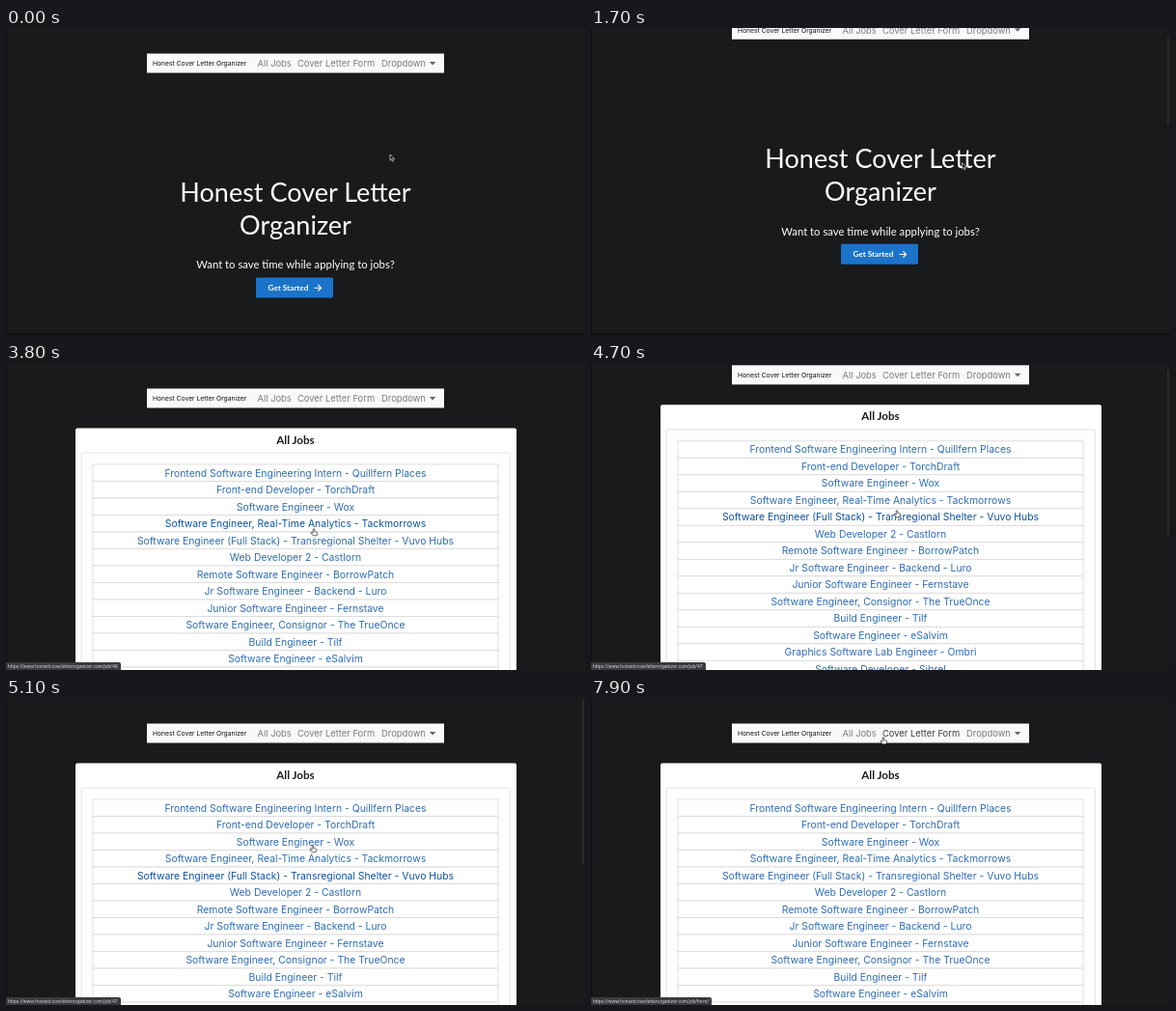
These frames come from a looping animation (600 px wide and 318 px high, 8 s). An HTML page:

```html
<!DOCTYPE html>
<html lang="en">
<head>
<meta charset="utf-8">
<title>Cover letter app</title>
<style>
html, body { margin: 0; width: 100%; height: 100%; overflow: hidden; background: #181a1b; }
svg { position: absolute; left: 0; top: 0; display: block; }
text { font-family: Inter, "Liberation Sans", sans-serif; }
.lato { font-family: Lato, "Open Sans", sans-serif; }
.bold { font-weight: 700; }
.mid { text-anchor: middle; }
.nav text { font-size: 9.4px; fill: #7c7c7e; }
.nav .brand { font-size: 6.76px; fill: #111; }
.nav .on { fill: #3d3d40; }
.foot { font-size: 5.6px; fill: #77797b; }
.foot .head { font-size: 6.3px; fill: #fff; }
.row rect { fill: #fff; stroke: #d8d8d8; stroke-width: .8; }
.row text { font-size: 10.4px; fill: #2f6db3; }
.row.on text { fill: #0f529e; }
#status {
  position: absolute; left: 0; top: 309.5px; height: 8.5px; padding: 0 3px 0 2px;
  border-radius: 0 2px 0 0; background: #393b3e; color: #dcdcdc; white-space: pre;
  font: 4.65px/8.5px Inter, "Liberation Sans", sans-serif;
}
</style>
</head>
<body>
<svg width="600" height="318" viewBox="0 0 600 318">
  <rect width="600" height="318" fill="#181a1b"/>
  <g id="page">
    <g class="nav">
      <rect x="146" y="26.5" width="308" height="20" fill="#f8f9fb"/>
      <text class="brand" x="152" y="39.3">Honest Cover Letter Organizer</text>
      <text x="260.5" y="40.3">All Jobs</text>
      <text id="form" x="302" y="40.3">Cover Letter Form</text>
      <g id="drop">
        <text x="389" y="40.3">Dropdown</text>
        <path d="M438.8 35h6.6l-3.3 3.4z" fill="#666"/>
      </g>
    </g>
    <g id="home" class="lato">
      <g fill="#fff" class="mid">
        <text class="lato" x="300" y="180" font-size="27">Honest Cover Letter</text>
        <text class="lato" x="300" y="214" font-size="27">Organizer</text>
        <text class="lato" x="300" y="249.3" font-size="11.3">Want to save time while applying to jobs?</text>
      </g>
      <rect id="button" x="259" y="258.5" width="80" height="21" rx="1.5" fill="#1b74c9"/>
      <text class="lato bold" x="271.5" y="272.2" font-size="8.2" fill="#fff">Get Started</text>
      <path d="M319.5 269.2h7M323.4 266l3.2 3.2-3.2 3.2" fill="none" stroke="#fff" stroke-width="1.1"/>
    </g>
    <g id="loading">
      <text class="lato bold mid" x="300" y="79.5" font-size="11.6">Loading</text>
      <path d="M147.5 109v40M235 109v40" stroke="#242627" stroke-width=".8"/>
      <g class="foot mid" id="foot"></g>
    </g>
    <g id="jobs">
      <rect x="72" y="67.5" width="457" height="420" rx="2" fill="#fff"/>
      <text class="lato bold mid" x="300" y="83.6" font-size="11.6" fill="#1b1c1d">All Jobs</text>
      <rect x="78" y="93" width="444.5" height="380" rx="2" fill="#fdfdfd" stroke="#dedede" stroke-width=".8"/>
      <g id="rows"></g>
    </g>
  </g>
  <rect y="316.6" width="600" height="1.4" fill="#0c0d0d" id="edge"/>
  <rect width=".7" height="318" fill="#0c0d0d"/>
  <rect id="thumb" x="597" width="2" rx="1" fill="#2a2a29"/>
  <g id="cursor" stroke-linejoin="round">
    <path id="arrow" d="M0 0v6.2l1.5-1.3 1 2.3 1.1-.5-1-2.2h2z" fill="#111" stroke="#ddd" stroke-width=".7"/>
    <path id="hand" d="M-.8 .6Q0-.4.8.6V3l2 .5q1 .3.8 1.5L3 7.3H-.9L-3 4.6q-.3-1 .8-.8l1.4.9z" fill="#fff" stroke="#222" stroke-width=".7"/>
  </g>
</svg>
<div id="status"></div>
<script>
const LOOP = 8000, STEP = 100;
const SITE = 'https://www.honestcoverletterorganizer.com/';
const $ = id => document.getElementById(id);
const SVG = 'http://www.w3.org/2000/svg';

function add(parent, tag, attrs, label) {
  const el = document.createElementNS(SVG, tag);
  for (const k in attrs) el.setAttribute(k, attrs[k]);
  if (label) el.textContent = label;
  return parent.appendChild(el);
}

const columns = [
  [103, 'Creator', 'Personal Portfolio', 'Forkyn', 'Tradelio'],
  [191, 'About', 'About', 'FAQ', 'How To Access'],
  [337.5, 'Footer Header', 'Any suggestions or comments please send to']
];
columns.forEach(([x, head, ...lines]) => {
  add($('foot'), 'text', { x, y: 116.4, class: 'lato bold head' }, head);
  lines.forEach((s, i) => add($('foot'), 'text',
    { x, y: 129.4 + i * 9.2, fill: x > 300 ? '#d0d0d0' : '#77797b' }, s));
});

const jobs = [
  'Frontend Software Engineering Intern - Quillfern Places',
  'Front-end Developer - TorchDraft',
  'Software Engineer - Wox',
  'Software Engineer, Real-Time Analytics - Tackmorrows',
  'Software Engineer (Full Stack) - Transregional Shelter - Vuvo Hubs',
  'Web Developer 2 - Castlorn',
  'Remote Software Engineer - BorrowPatch',
  'Jr Software Engineer - Backend - Luro',
  'Junior Software Engineer - Fernstave',
  'Software Engineer, Consignor - The TrueOnce',
  'Build Engineer - Tilf',
  'Software Engineer - eSalvim',
  'Graphics Software Lab Engineer - Ombri',
  'Software Developer - Sibrel'
];
const rows = jobs.map((job, i) => {
  const g = add($('rows'), 'g', { class: 'row' }), y = 105 + i * 17.5;
  add(g, 'rect', { x: 90, y, width: 420, height: 17.5 });
  add(g, 'text', { x: 300, y: y + 12.7, class: 'mid' }, job);
  return g;
});

const scroll = [[900, 0], [1800, -36], [2699, -36], [2700, 0], [3100, 0], [3500, 61],
  [3800, 0], [4200, 0], [4600, -27], [5100, 0]];
const pointer = [[500, 398, 131], [700, 384.5, 139.5], [2200, 384.5, 139.5], [2400, 338, 221],
  [2600, 338, 221], [3000, 319, 171.5], [3900, 319, 171.5], [4100, 317, 152.5],
  [4900, 317, 152.5], [5100, 318, 152.5], [5300, 318, 124], [5700, 318, 124],
  [6200, 412, 37], [6500, 403, 41.5], [6600, 403, 41.5], [7100, 350, 186],
  [7300, 350, 186], [7600, 405, 37], [7900, 303, 40.5]];
// time, hovered row or nav item, path in the status bubble
const hovers = [[0], [3700, 3, 'job/46'], [4000, 2, 'job/45'], [4400, 4, 'job/47'],
  [5200, 1, 'job/44'], [5900, 0, 'job/43'], [6000], [6100, 'drop'], [6700],
  [6900, 1, 'job/44'], [7000, 3, 'job/46'], [7100, 4, 'job/47'], [7400, 2, 'job/45'],
  [7500, 0, 'job/43'], [7600, 'drop', '#'], [7800, 'form', 'job/form/']];

const smooth = u => u * u * (3 - 2 * u);

function at(keys, t, axis, ease = u => u) {
  const i = keys.findIndex(k => k[0] > t);
  if (i < 0) return keys[keys.length - 1][axis];
  if (!i) return keys[0][axis];
  const a = keys[i - 1], b = keys[i];
  return a[axis] + (b[axis] - a[axis]) * ease((t - a[0]) / (b[0] - a[0]));
}

const show = (id, on) => { $(id).style.display = on ? '' : 'none'; };

function draw(t) {
  const y = at(scroll, t, 1, smooth);
  $('page').setAttribute('transform', `translate(0 ${y.toFixed(2)})`);
  show('home', t < 2700);
  show('loading', t >= 2700 && t < 3600);
  show('jobs', t >= 3600);
  show('edge', t < 3600);
  $('button').setAttribute('fill', t < 2000 ? '#1b74c9' : t < 2600 ? '#176ab9' : '#145b9f');

  const [, target, path] = hovers.filter(h => h[0] <= t).pop();
  rows.forEach((r, i) => r.classList.toggle('on', i === target));
  $('form').classList.toggle('on', target === 'form');
  $('drop').firstElementChild.classList.toggle('on', target === 'drop');
  show('status', path);
  $('status').textContent = path ? SITE + path : '';

  show('thumb', (t >= 1000 && t < 2400) || (t >= 4300 && t < 5600));
  $('thumb').setAttribute('y', Math.max(1, -y * .28));
  $('thumb').setAttribute('height', t >= 3600 ? 172 : 90);

  $('cursor').setAttribute('transform', `translate(${at(pointer, t, 1)} ${at(pointer, t, 2)})`);
  show('arrow', t < 2400);
  show('hand', t >= 2400);
}

let start;
function tick(time) {
  start ??= time;
  draw(Math.floor((time - start) % LOOP / STEP) * STEP);
  requestAnimationFrame(tick);
}
draw(0);
requestAnimationFrame(tick);
</script>
</body>
</html>
```
